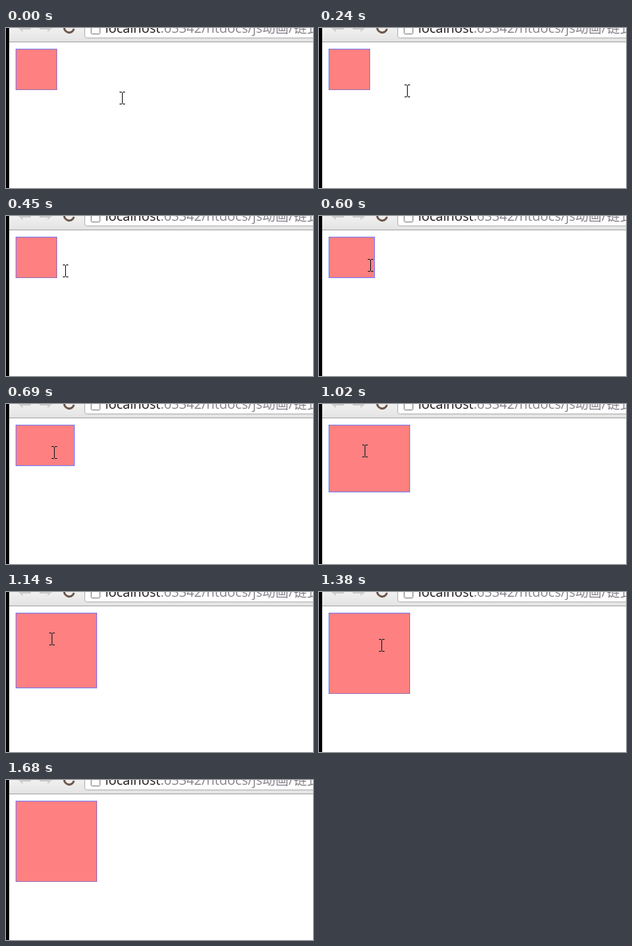
Animation, 384 px wide and 201 px high, one loop 2.13 s. Source, as an HTML page:

```html
<!DOCTYPE html>
<html lang="en">
<head>
<meta charset="utf-8">
<title>Chained box animation</title>
<style>
  html, body { margin: 0; width: 100%; height: 100%; overflow: hidden; background: #fff; }
  .stage { position: relative; width: 384px; height: 201px; overflow: hidden; background: #fff; }
  .chrome { position: absolute; left: 0; top: 0; }
  .url { font: 16.5px "Open Sans", "Noto Sans", "Noto Sans CJK SC", "Noto Sans CJK", sans-serif; }

  .box {
    --edge: #8080ff;
    position: absolute; left: 12px; top: 26px; width: 50px; height: 50px;
    background: #ff8080; border: 1px solid var(--edge);
    border-right-color: #a479b4; border-bottom-color: #a479b4;
    animation: grow 2130ms infinite, light 2130ms step-end infinite;
  }
  .cursor {
    position: absolute; left: 142px; top: 80px;
    animation: roam 2130ms infinite;
  }

  /* One step per 30 ms tick; the loop has 71 ticks */
  @keyframes grow {
    0% { width: 50px; height: 50px; animation-timing-function: step-end; }
    26.76% { width: 50px; height: 50px; animation-timing-function: steps(4); }
    32.39% { width: 72px; height: 50px; animation-timing-function: steps(6); }
    40.84% { width: 100px; height: 50px; animation-timing-function: steps(5); }
    47.88% { width: 100px; height: 83px; animation-timing-function: steps(3); }
    52.11% { width: 100px; height: 89px; animation-timing-function: steps(3); }
    56.33%, 100% { width: 100px; height: 100px; }
  }
  /* The moving edges are brighter while the box grows */
  @keyframes light {
    28.16% { border-right-color: var(--edge); border-bottom-color: var(--edge); }
    56.33% { border-right-color: #a479b4; border-bottom-color: #a479b4; }
  }
  @keyframes roam {
    0% { left: 142px; top: 80px; animation-timing-function: step-end; }
    1.4% { left: 142px; top: 80px; animation-timing-function: steps(14); }
    21.12% { left: 71px; top: 61px; animation-timing-function: steps(4); }
    26.76% { left: 62px; top: 54px; animation-timing-function: steps(4); }
    32.39% { left: 57px; top: 53px; animation-timing-function: steps(5); }
    39.43% { left: 54px; top: 51px; animation-timing-function: step-end; }
    64.78% { left: 75px; top: 59px; animation-timing-function: steps(10); }
    78.87%, 100% { left: 354px; top: 203px; }
  }
</style>
</head>
<body>
<div class="stage">
  <svg class="chrome" width="384" height="201">
    <linearGradient id="bar" x2="0" y2="1">
      <stop stop-color="#f0f0f0"/>
      <stop offset="1" stop-color="#e4e4e4"/>
    </linearGradient>
    <rect width="384" height="17" fill="url(#bar)"/>
    <rect y="17" width="384" height="1" fill="#aaa"/>
    <g fill="#cdcdcd">
      <path d="M13-2 21 5V2H31V-2Z"/>
      <path d="M60-2 52 5V2H42V-2Z"/>
    </g>
    <path d="M73-2A6 6 0 0 0 85 1" fill="none" stroke="#6b5448" stroke-width="2.5"/>
    <path d="M98.5-4V9.5Q98.5 12.5 101.5 12.5H390V-4Z" fill="#fff" stroke="#b4b4b4"/>
    <path d="M106.5-4V6.5Q106.5 7.5 107.5 7.5H116.5Q117.5 7.5 117.5 6.5V-4" fill="#fff" stroke="#858585"/>
    <text class="url" x="124" y="6" fill="#857f8a"><tspan fill="#1c1418">localhost</tspan>:63342/htdocs/js动画/链式</text>
    <rect width="4" height="201"/>
  </svg>
  <div class="box"></div>
  <svg class="cursor" width="7" height="16" fill="#262626" shape-rendering="crispEdges">
    <path d="M0 0H3V1H4V0H7V1H4V15H7V16H4V15H3V16H0V15H3V1H0Z"/>
  </svg>
</div>
</body>
</html>
```
